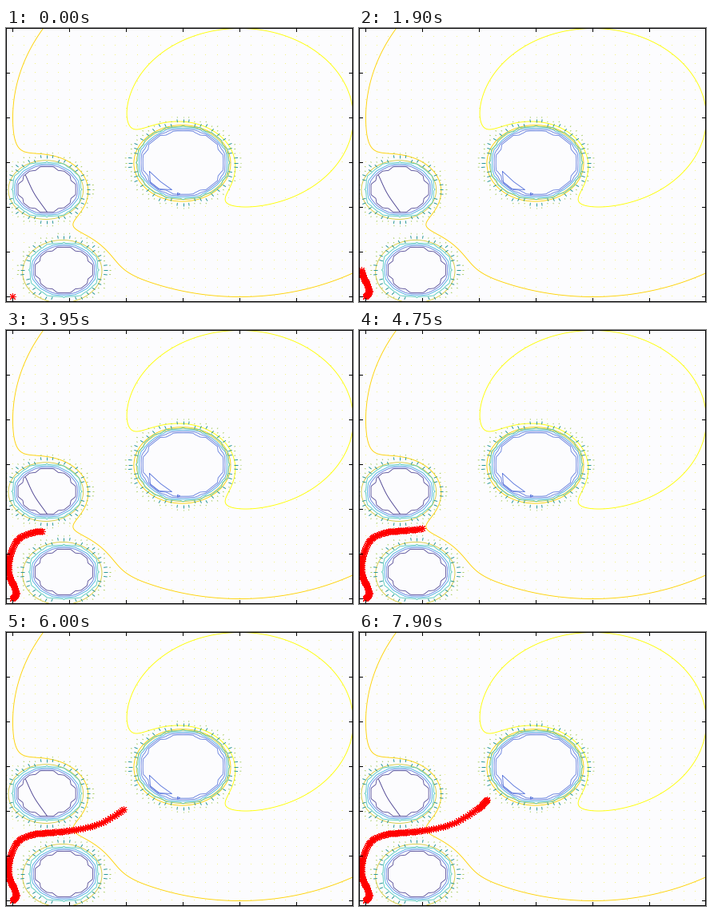
Write a matplotlib script that moves like this. It is 434 px wide and 343 px high and loops after 8000 ms.

```python
import numpy as np
import matplotlib.pyplot as plt
from matplotlib.animation import FuncAnimation
from matplotlib.collections import LineCollection

W, H, DPI = 434, 343, 100
FRAMES, STEP = 160, 50
PX = 72 / DPI                      # one pixel in points
X0, Y0, UX, UY = 8, 336, 71, 56    # origin and size of one unit
GOAL = (4, 4)
REPULSION = 0.075

NAVY, BLUE, SKY, TEAL = "#4a4090", "#5a76dc", "#3caae0", "#46c8b4"
YELLOW, AMBER, GOLD = "#ffff00", "#ffd200", "#d8cc40"
ARROW, FAR_ARROW, DOT = "#148c8c", "#a0c850", "#f2f28a"

# centre x, centre y, radius, inner and outer ring, inner colour
OBSTACLES = [
    (3.0, 3.0, 0.7, 0.72, 0.81, BLUE),
    (0.6, 2.4, 0.5, 0.51, 0.61, NAVY),
    (0.9, 0.6, 0.5, 0.51, 0.61, NAVY),
]


def to_px(x, y):
    return X0 + UX * x, Y0 - UY * y


def grid(step):
    axis = np.arange(-0.1, 6.1 + step / 2, step)
    return np.meshgrid(axis, axis)


def potential(x, y):
    """Distance to the goal plus a steep wall around every obstacle."""
    u = np.hypot(x - GOAL[0], y - GOAL[1])
    for cx, cy, radius, *_ in OBSTACLES:
        gap = np.maximum(np.hypot(x - cx, y - cy) - radius, 0.03)
        u += REPULSION * np.maximum(1 / gap - 1, 0) ** 2
    return u


def spline(points, n):
    """Catmull-Rom curve with n steps between neighbouring points."""
    p = np.asarray(points, float)
    p = np.vstack([2 * p[0] - p[1], p, 2 * p[-1] - p[-2]])
    t = np.arange(n)[:, None] / n
    parts = [0.5 * (2 * b + (c - a) * t + (2 * a - 5 * b + 4 * c - d) * t**2
                    + (3 * b - a - 3 * c + d) * t**3)
             for a, b, c, d in zip(p, p[1:], p[2:], p[3:])]
    return np.vstack(parts + [p[-2:-1]])


fig = plt.figure(figsize=(W / DPI, H / DPI), dpi=DPI, facecolor="#fcfcfe")
ax = fig.add_axes([0, 0, 1, 1])
ax.set_xlim(-0.5, W - 0.5)
ax.set_ylim(H - 0.5, -0.5)
ax.axis("off")


def line(points, color, width=1.0, z=4):
    x, y = zip(*points)
    ax.plot(x, y, color=color, lw=width * PX, snap=False, zorder=z)


def draw_frame():
    right, bottom = W - 1, H - 1
    line([(0, 0), (right, 0), (right, bottom), (0, bottom), (0, 0)], "black", z=6)
    for k in range(6):
        x, y = to_px(k, k)
        for end, inward in ((0, 4), (bottom, bottom - 4)):
            line([(x, end), (x, inward)], "black", z=6)
        for end, inward in ((0, 4), (right, right - 4)):
            line([(end, y), (inward, y)], "black", z=6)


def draw_levels():
    x, y = grid(0.02)
    ax.contour(*to_px(x, y), potential(x, y), levels=[2, 4, 6],
               colors=[YELLOW, AMBER, GOLD], linewidths=0.9 * PX, zorder=2)


def draw_dots():
    x, y = grid(0.1)
    gap = np.min([np.hypot(x - o[0], y - o[1]) - o[4] for o in OBSTACLES], axis=0)
    show = (gap > 0.2) & (np.round(x * 10) % 2 == 0) & (np.round(y * 10) % 2 == 0)
    px, py = to_px(x[show], y[show])
    ax.plot(px - 0.5, py - 0.5, ",", color=DOT, zorder=1)


def draw_obstacle(cx, cy, radius, inner, outer, core):
    x, y = grid(0.1)
    dist = np.hypot(x - cx, y - cy)
    height = np.clip((outer - dist) / (outer - inner), 0, 1)
    ax.contour(*to_px(x, y), height, levels=[0.08, 0.35, 0.65, 0.93],
               colors=[TEAL, SKY, BLUE, core], linewidths=0.8 * PX, zorder=3)

    # Short radial arrows, fading with distance
    for near, far, size, color in ((0, 0.1, 0.065, ARROW), (0.1, 0.2, 0.025, FAR_ARROW)):
        m = (dist > outer + near) & (dist <= outer + far)
        ux, uy = (x[m] - cx) / dist[m], (y[m] - cy) / dist[m]
        start = np.column_stack(to_px(x[m], y[m]))
        end = np.column_stack(to_px(x[m] + size * ux, y[m] + size * uy))
        ax.add_collection(LineCollection(np.stack([start, end], axis=1), colors=color,
                                         linewidths=0.9 * PX, zorder=3))


def draw_loose_pieces():
    line([(179, 179), (193, 192), (207, 202), (190, 201), (180, 193), (179, 179)],
         BLUE, 0.9)
    line([(214, 206), (217, 207), (214, 209), (214, 206)], BLUE, 0.9)
    line(spline([(24, 184), (35, 207), (51, 230)], 8), NAVY, 0.9)


def robot_path():
    """One position per step: a curve through evenly timed points, then a slow drift."""
    keys = [(8, 336), (12.5, 330), (9.5, 320), (3.5, 306), (4, 287), (13, 264),
            (32, 253.5), (55, 251), (82, 248), (116, 240), (147, 222), (159.5, 210)]
    path = spline(keys, 12)
    path = np.vstack([path, np.repeat(path[-1:], FRAMES - len(path), axis=0)])
    nudges = np.maximum((np.arange(FRAMES) * STEP - 6650) // 500, 0)
    return path + np.outer(nudges, (-0.3, 0.7))


draw_frame()
draw_levels()
draw_dots()
for obstacle in OBSTACLES:
    draw_obstacle(*obstacle)
draw_loose_pieces()

path_x, path_y = robot_path().T - 0.5   # markers snap to the next pixel
trail, = ax.plot([], [], linestyle="none", marker=(8, 2, 0), markersize=9 * PX,
                 color="red", markeredgewidth=PX, antialiased=False, zorder=5)


def update(i):
    trail.set_data(path_x[:i + 1], path_y[:i + 1])
    return trail,


anim = FuncAnimation(fig, update, frames=FRAMES, interval=STEP, repeat=True,
                     repeat_delay=0, blit=False)
plt.show()
```
